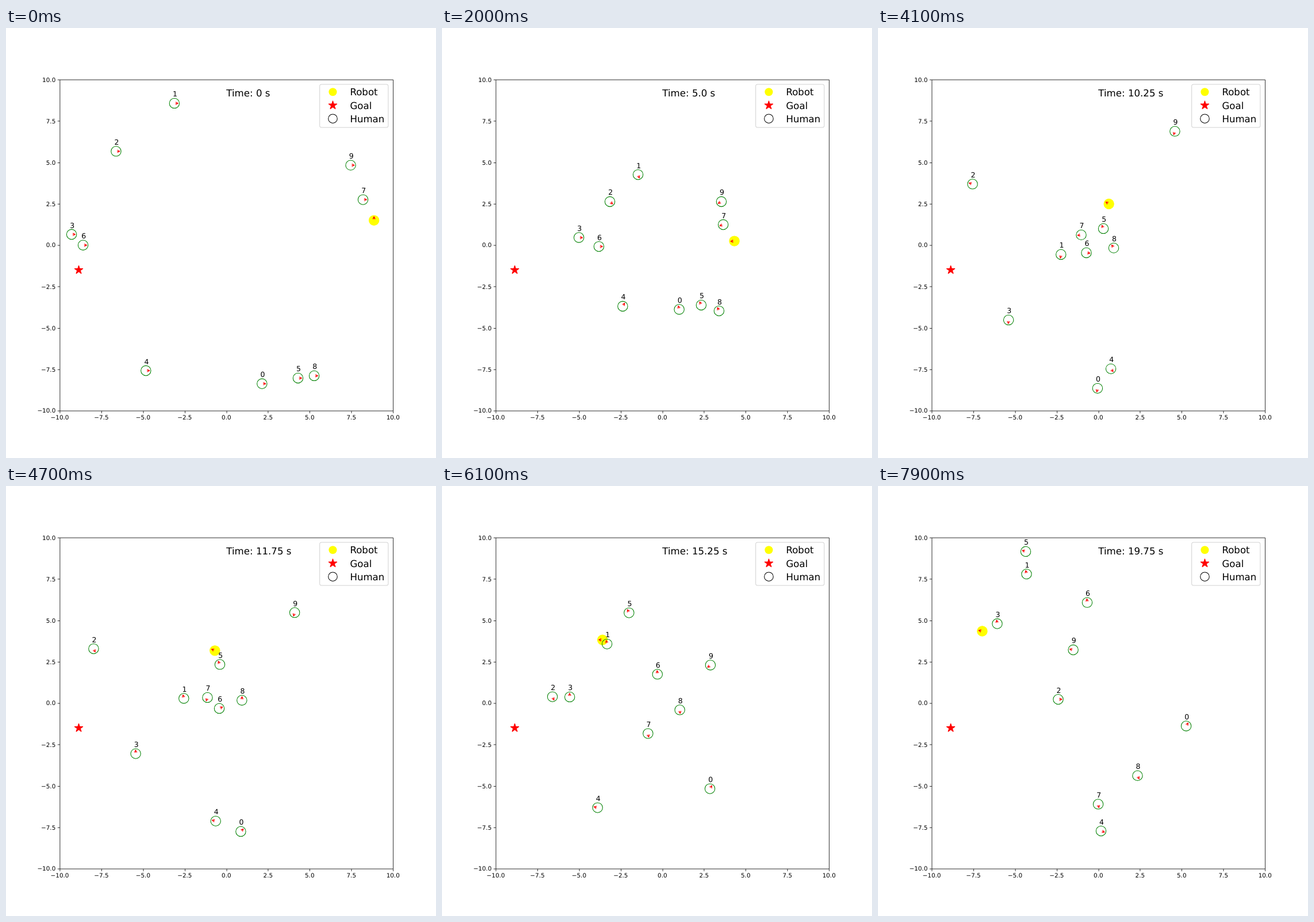
An HTML page for the animation above (8 s loop, 748 by 748 pixels).

```html
<!DOCTYPE html>
<html lang="en">
<head>
<meta charset="utf-8">
<title>Crowd navigation</title>
<style>
  html, body { margin: 0; width: 100%; height: 100%; overflow: hidden; background: #fff; }
  svg { display: block; width: 748px; height: 748px; }
  text { font-family: "DejaVu Sans", sans-serif; text-rendering: geometricPrecision; }
  .tick { font-size: 13.89px; }
  .id { font-size: 16.67px; }
  .big { font-size: 22.22px; }
  .line { fill: none; stroke: #000; stroke-width: 1.39; }
  .frame { fill: none; stroke: #000; stroke-width: 1.1; }
  .human { fill: none; stroke: green; stroke-width: 1.39; }
  .robot { fill: #ff0; stroke: #ff0; stroke-width: 1.39; }
  .arrow { fill: none; stroke: red; stroke-width: 1.39; stroke-linecap: round; stroke-linejoin: round; }
  .star { fill: red; stroke: red; stroke-width: 1.39; stroke-linejoin: bevel; }
</style>
</head>
<body>
<svg id="stage" viewBox="0 0 1000 1000"></svg>
<script>
const stage = document.getElementById('stage');
const FRAMES = 80, FRAME_MS = 100, STEP = 0.25, END = 19.75;

// Plot units to drawing units.
const UNIT_X = 38.75, UNIT_Y = 38.5;
const px = x => 512.5 + UNIT_X * x;
const py = y => 505 - UNIT_Y * y;

function add(tag, attrs, parent = stage) {
  const el = document.createElementNS('http://www.w3.org/2000/svg', tag);
  for (const key in attrs) el.setAttribute(key, attrs[key]);
  parent.append(el);
  return el;
}

function label(content, x, y, cls, anchor = 'start', parent = stage) {
  const el = add('text', { x, y, class: cls, 'text-anchor': anchor }, parent);
  el.textContent = content;
  return el;
}

function star(cx, cy) {
  let points = '';
  for (let i = 0; i < 10; i++) {
    const r = 10.4 * (i % 2 ? 0.382 : 1), a = i * Math.PI / 5;
    points += `${cx + r * Math.sin(a)},${cy - r * Math.cos(a)} `;
  }
  add('polygon', { points, class: 'star' });
}

function axes() {
  const snap = v => Math.floor(v + 0.5) + 0.5;
  let d = 'M125.5 120.5h775v770h-775z';
  for (let value = -10; value <= 10; value += 2.5) {
    const x = px(value), y = py(value);
    const name = (value < 0 ? '\u2212' : '') + Math.abs(value).toFixed(1);
    d += `M${snap(x)} 890.5v5.4M125.5 ${snap(y)}h-5.4`;
    label(name, x, 911, 'tick', 'middle');
    label(name, 115.3, Math.round(y + 5.3), 'tick', 'end');
  }
  add('path', { d, class: 'frame' });
}

function legend() {
  add('rect', { x: 729.5, y: 131.1, width: 159.4, height: 100.3, rx: 4.4, fill: '#fff', stroke: '#d2d2d2', 'stroke-width': 1.39 });
  add('circle', { cx: 760, cy: 148.8, r: 9.4, fill: '#ff0' });
  star(760, 179.8);
  add('circle', { cx: 760, cy: 210.8, r: 10.4, class: 'line' });
  ['Robot', 'Goal', 'Human'].forEach((name, i) => label(name, 800, 157 + 31 * i, 'big'));
}

// Waypoints are [seconds, x, y]; walkers go straight between them.
function straight(path, i, axis, u) {
  const a = path[i][axis], b = path[i + 1][axis];
  return a + (b - a) * u;
}

// The robot steers smoothly through its waypoints.
function curved(path, i, axis, u) {
  const slope = k => {
    const a = path[Math.max(k - 1, 0)], b = path[Math.min(k + 1, path.length - 1)];
    return (b[axis] - a[axis]) / (b[0] - a[0]);
  };
  const dt = path[i + 1][0] - path[i][0], v = 1 - u;
  const ease = u * u * (3 - 2 * u);
  return straight(path, i, axis, ease) + dt * u * v * (v * slope(i) - u * slope(i + 1));
}

function place({ path, move }, t) {
  let i = 0;
  while (i < path.length - 2 && path[i + 1][0] < t) i++;
  const u = (t - path[i][0]) / (path[i + 1][0] - path[i][0]);
  return [px(move(path, i, 1, u)), py(move(path, i, 2, u))];
}

const agents = [];

function agent(kind, name, move, startAngle, path) {
  const group = add('g', {});
  add('ellipse', { rx: 0.3 * UNIT_X, ry: 0.3 * UNIT_Y, class: kind }, group);
  const arrow = add('path', { d: 'M2.8 0H8.6M3.2-2.8L8.6 0L3.2 2.8', class: 'arrow' }, group);
  label(name, -0.1 * UNIT_X, -0.4 * UNIT_Y, 'id', 'start', group);
  agents.push({ group, arrow, move, startAngle, path });
}

const human = (id, ...path) => agent('human', id, straight, 0, path);
const robot = (...path) => agent('robot', '', curved, -90, path);

axes();
star(px(-8.86), py(-1.5));
const clock = label('', px(0), 159, 'big');

robot([0, 8.86, 1.5], [5, 4.32, 0.25], [7.75, 2.54, 0.89], [10.25, 0.63, 2.49],
  [13.25, -2.01, 3.64], [17, -4.93, 3.9], [END, -6.97, 4.35]);
human(0, [0, 2.14, -8.37], [5, 1.01, -3.88], [10.25, -0.05, -8.65], [13.25, 1.78, -6.85], [END, 5.27, -1.38]);
human(1, [0, -3.12, 8.57], [5, -1.46, 4.26], [10.55, -2.29, -0.84], [END, -4.31, 7.8]);
human(2, [0, -6.62, 5.67], [5, -3.15, 2.63], [7.75, -5.19, 2.96], [11, -8.26, 3.91], [15.5, -6.5, 0.18], [END, -2.41, 0.23]);
human(3, [0, -9.29, 0.65], [5, -5.01, 0.46], [10.25, -5.39, -4.52], [17, -5.62, 2.09], [END, -6.07, 4.8]);
human(4, [0, -4.83, -7.58], [5, -2.38, -3.69], [10.25, 0.75, -7.47], [15.35, -3.98, -6.29], [END, 0.16, -7.72]);
human(5, [0, 4.3, -8.03], [5, 2.33, -3.62], [10.25, 0.3, 1], [19.2, -3.82, 8.98], [END, -4.36, 9.16]);
human(6, [0, -8.6, 0], [5, -3.81, -0.08], [10.25, -0.72, -0.46], [13.25, -0.13, -0.18], [END, -0.67, 6.08]);
human(7, [0, 8.2, 2.75], [5, 3.65, 1.24], [10.25, -1.03, 0.62], [13.25, -1.24, 0.06], [END, -0.01, -6.1]);
human(8, [0, 5.27, -7.89], [5, 3.4, -3.97], [10.25, 0.92, -0.17], [14, 0.95, 0.69], [17, 1.18, -1.94], [END, 2.35, -4.38]);
human(9, [0, 7.46, 4.83], [5, 3.54, 2.63], [9.8, 4.74, 7.3], [15.15, 2.98, 2.28], [END, -1.51, 3.22]);
legend();

function draw(n) {
  const t = n * STEP;
  clock.textContent = `Time: ${t && Number.isInteger(t) ? t.toFixed(1) : t} s`;
  for (const a of agents) {
    const [x, y] = place(a, t);
    let angle = a.startAngle;
    if (n > 0) {
      const [x0, y0] = place(a, t - STEP);
      angle = Math.atan2(y - y0, x - x0) * 180 / Math.PI;
    }
    a.group.setAttribute('transform', `translate(${x} ${y})`);
    a.arrow.setAttribute('transform', `rotate(${angle})`);
  }
}

const start = performance.now();
function tick() {
  draw(Math.floor((performance.now() - start) / FRAME_MS) % FRAMES);
  requestAnimationFrame(tick);
}
tick();
</script>
</body>
</html>
```
